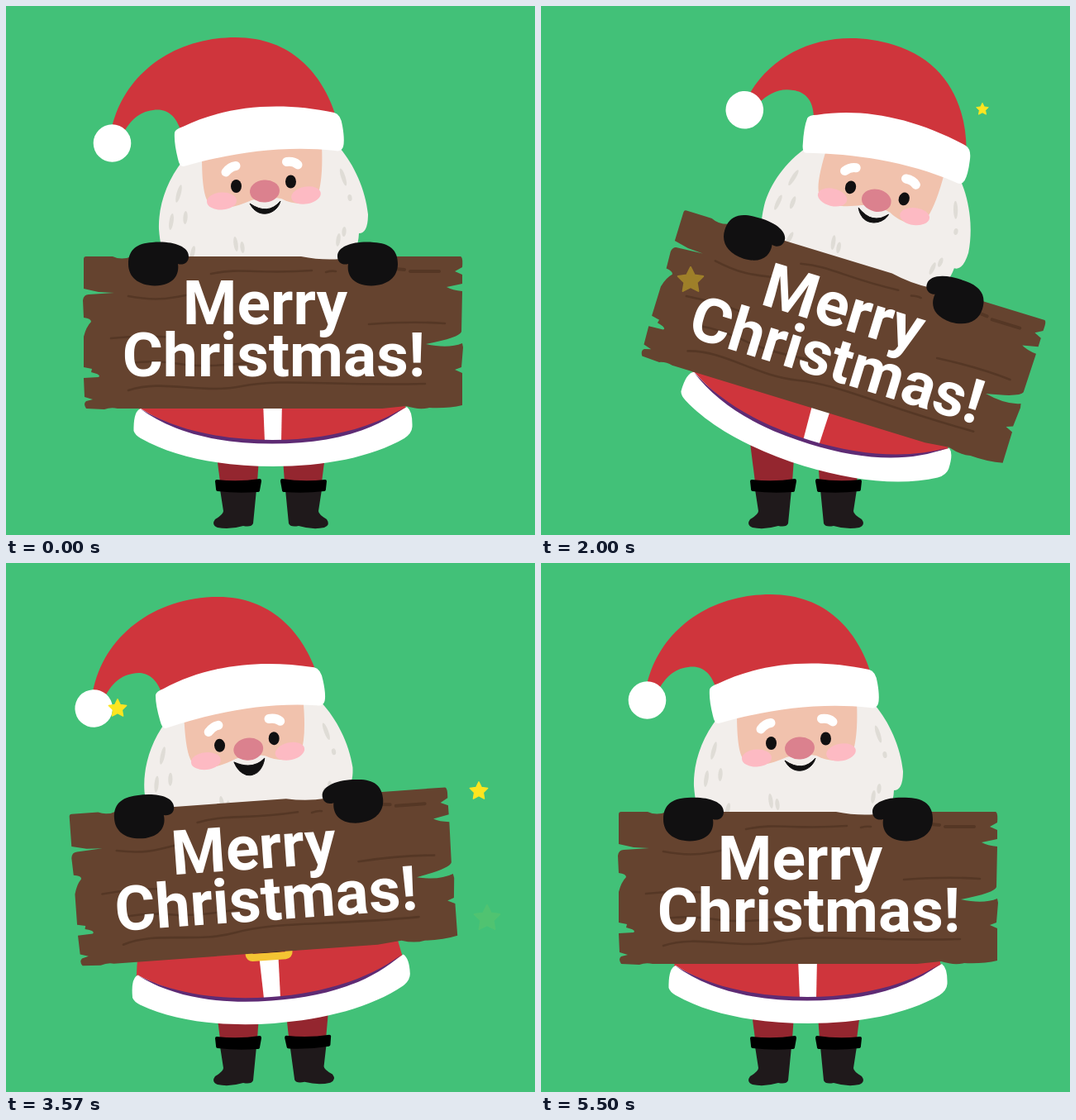
Recreate the animation shown at these times as an HTML page. Size 640x640 px, loop 5.57 s.

```html
<!DOCTYPE html>
<html lang="en">
<head>
<meta charset="utf-8">
<title>Merry Christmas</title>
<style>
html, body { margin: 0; width: 100%; height: 100%; overflow: hidden; background: #42c178; }
svg { display: block; width: 100%; height: 100%; }
text { font: bold 75px Roboto, sans-serif; fill: #fff; text-anchor: middle; }
.grain { fill: none; stroke: #553725; stroke-width: 2.6; stroke-linecap: round; }
</style>
</head>
<body>
<svg viewBox="0 0 640 640">
  <defs>
    <g id="leg">
      <path fill="#94262f" d="M250 505H309L304 576H259Z"/>
      <path fill="#1f191b" d="M259 585H303L299 626Q297 631 287 629Q270 634 256 631Q248 628 253 621Q263 615 263 611Z"/>
      <path d="M255 573Q281 576 307 572Q309 572 309 575L307 586Q307 588 304 588Q280 590 256 587Q254 587 254 584L253 575Q253 573 255 573Z"/>
    </g>
    <path id="mitten" fill="#111011" d="M148 312C148 295 158 287 177 286C200 284 221 290 221 303C221 311 214 314 208 312C210 325 203 338 180 338.500C160 338 148 328 148 312Z"/>
  </defs>

  <g id="left"><use href="#leg"/></g>
  <g id="right"><use href="#leg" transform="matrix(-1 0 0 1 641 0)"/></g>

  <g id="body">
    <path fill="#cf353c" d="M161 490Q166 440 185 370H455Q472 430 484 488Q410 530 322 530Q230 530 161 490Z"/>
    <path fill="#fff" d="M311 478H334L333 527H313Z"/>
    <path fill="#111011" d="M200 430H440L434 458Q322 486 209 456Z"/>
    <rect x="299" y="436" width="48" height="40" rx="4" fill="none" stroke="#f4c433" stroke-width="9"/>
    <path fill="#fff" d="M163 487Q154 490 154.500 514Q156 519 163 523C205 547 265 557 323 557C385 557 442 546 482 523Q491 517 491.500 509Q492 490 485 485C440 513 382 527 322 527C260 527 205 514 163 487Z"/>
    <path fill="#5e2b74" d="M162 487C205 513 260 525 322 525C387 525 442 511 483 485C442 517 387 529.500 322 529.500C260 529.500 205 518 162 487Z"/>

    <g id="head">
      <path fill="#f2eeeb" d="M214 187C194 212 184 243 185 270Q187 297 193 299Q200 302 208 301Q212 313 230 318C270 330 370 330 410 312Q426 298 427 275Q438 275 438 252C435 222 421 192 404 172L395 145L222 165Z"/>
      <g id="flecks" fill="#dfdcd6"></g>
      <path fill="#f1c2ad" d="M237 160V180C237 212 239 236 249 242C267 248 285 240 297 235Q315 229 333 233C350 242 367 240 376 232Q384 212 382 168V145Z"/>
      <ellipse cx="261" cy="236" rx="18" ry="10.500" fill="#fdbac3" transform="rotate(-3 261 236)"/>
      <ellipse cx="363" cy="229" rx="18" ry="10.500" fill="#fdbac3" transform="rotate(-10 363 229)"/>
      <path id="mouth" fill="#111011" stroke="#111011" stroke-linejoin="round"/>
      <ellipse cx="313" cy="224" rx="18" ry="13.500" fill="#db818e" transform="rotate(-5 313 224)"/>
      <ellipse id="eyeL" cx="278.500" cy="218" rx="6.500" ry="8" fill="#111011"/>
      <ellipse id="eyeR" cx="344.500" cy="212.500" rx="6.500" ry="8" fill="#111011"/>
      <path fill="none" stroke="#fff" stroke-width="11" stroke-linecap="round" d="M266 201Q271 194.500 278 193.500M339.500 188.500Q348 187.500 353 192"/>
      <g id="hat">
        <path fill="#cf353c" d="M127 152C140 85 200 38 278 38C345 38 383 82 399 133L212 153C205 128 190 124 178 126C160 128 150 140 143 152Z"/>
        <path fill="#fff" d="M204 153Q205 149 214 146C265 121 330 115 397 129Q405 131 407 145Q410 162 408 170Q406 177 398 175C335 168 270 178 215 194Q210 195 208 185Q203 165 204 153Z"/>
        <circle cx="128.500" cy="166" r="22.800" fill="#fff"/>
      </g>
    </g>

    <g id="board">
      <path fill="#65432f" d="M97 303H129Q140 308 152 303H357Q382 308 405 306L425 303H550Q553 304 552 316L543 321L552 325V336L533 340Q540 344 552 345L551 394Q549 401 508 409Q535 415 552 408L553 413L551 437L543 440L552 444V483Q535 487 512 486Q500 489 484 484L455 487H135Q127 485 119 488L97 487Q93 481 97 478L105 476L95 473L94 450L112 449Q116 446 103 443L104 439L94 437V400Q97 388 103 382Q103 378 94 377L93 356Q94 349 100 349L131 347L112 346L94 342V306Q94 303 97 303Z"/>
      <g class="grain">
        <path d="M148 351C185 358 200 353 228 348M248 324C285 316 305 325 370 320M387 322Q394 320 399 321M439 385Q490 381 531 384"/>
        <path d="M127 402Q165 398 203 401M150 432Q180 428 210 433T300 431M148 465C190 451 235 470 285 460S390 460 507 457"/>
        <path stroke-width="4" d="M425 319Q450 315 482 319M489 321H524"/>
      </g>
      <text x="313.500" y="385">Merry</text>
      <text x="324" y="448">Christmas!</text>
      <use href="#mitten"/>
      <use href="#mitten" transform="matrix(-1 0 0 1 622 0)"/>
    </g>
  </g>
  <g id="stars" fill="#fee520" stroke="#fee520" stroke-width="2" stroke-linejoin="round"></g>
</svg>
<script>
const LOOP = 5570;
const $ = id => document.getElementById(id);
const clamp = x => Math.max(0, Math.min(1, x));

function add(parent, tag, attrs) {
  const el = document.createElementNS('http://www.w3.org/2000/svg', tag);
  for (const k in attrs) el.setAttribute(k, attrs[k]);
  return parent.appendChild(el);
}

// x, y, half height, tilt
[[209, 227, 11, 15], [200, 261, 10, 8], [217, 256, 8, 4], [278, 288, 9, -8], [286, 292, 7, -6],
 [226, 298, 8, 12], [408, 207, 11, -18], [416, 232, 4, -8], [409, 273, 6, 5], [402, 283, 8, 8]]
  .forEach(([x, y, h, tilt]) =>
    add($('flecks'), 'ellipse', { cx: x, cy: y, rx: 2.6, ry: h, transform: `rotate(${tilt} ${x} ${y})` }));

const starPoints = Array.from({ length: 10 }, (_, i) => {
  const r = i % 2 ? 8 : 16, a = i * Math.PI / 5;
  return [r * Math.sin(a), -r * Math.cos(a)];
}).join(' ');

// x, y, birth time
const stars = [[82, 268, 80], [181, 332, 1100], [534, 125, 1810], [582, 430, 2430],
  [135, 176, 3290], [572, 276, 3290], [69, 484, 4240]]
  .map(([x, y, birth]) => ({ x, y, birth, el: add($('stars'), 'polygon', { points: starPoints }) }));

function turn(id, angle, x, y) {
  $(id).setAttribute('transform', `rotate(${angle} ${x} ${y})`);
}

function draw(t) {
  const ease = (from, to) => (1 - Math.cos(Math.PI * clamp((t - from) / (to - from)))) / 2;

  const lean = 17 * ease(0, 1200) - 21.1 * ease(2000, 3000) + 4.1 * ease(3700, 5100);
  const nod = 17 * ease(240, 1420) - 19.7 * ease(2250, 3300) + 2.7 * ease(3900, 5100);
  turn('body', lean, 322, 540);
  turn('head', nod - lean, 317, 340);
  turn('hat', -4.5 * (ease(240, 700) - ease(800, 1400)), 317, 255);
  turn('left', 33.5 * (ease(0, 1000) - ease(1000, 2000)), 302, 457);
  turn('right', -16.4 * (ease(2000, 3000) - ease(3000, 3750)), 327, 439);

  const lift = 30 * (ease(3000, 4100) - ease(4500, 5700));
  $('board').setAttribute('transform', `translate(0 ${-lift})`);

  const laugh = ease(3000, 3600) - ease(4700, 5450);
  $('mouth').setAttribute('d',
    `M295 239Q317 ${254 - 4 * laugh} 332 236C328 ${252 + 6 * laugh} 305 ${259 + 6 * laugh} 295 239Z`);
  const lids = 8 - 6.8 * (ease(4100, 4350) - ease(4650, 4900));
  $('eyeL').setAttribute('ry', lids);
  $('eyeR').setAttribute('ry', lids);

  for (const { x, y, birth, el } of stars) {
    const age = t - birth;
    el.setAttribute('transform', `translate(${x} ${y}) scale(${clamp(age / 400)})`);
    el.setAttribute('opacity', age < 0 ? 0 : clamp((1200 - age) / 800));
  }
}

const start = performance.now();
function frame() {
  draw((performance.now() - start) % LOOP);
  requestAnimationFrame(frame);
}
frame();
</script>
</body>
</html>
```
